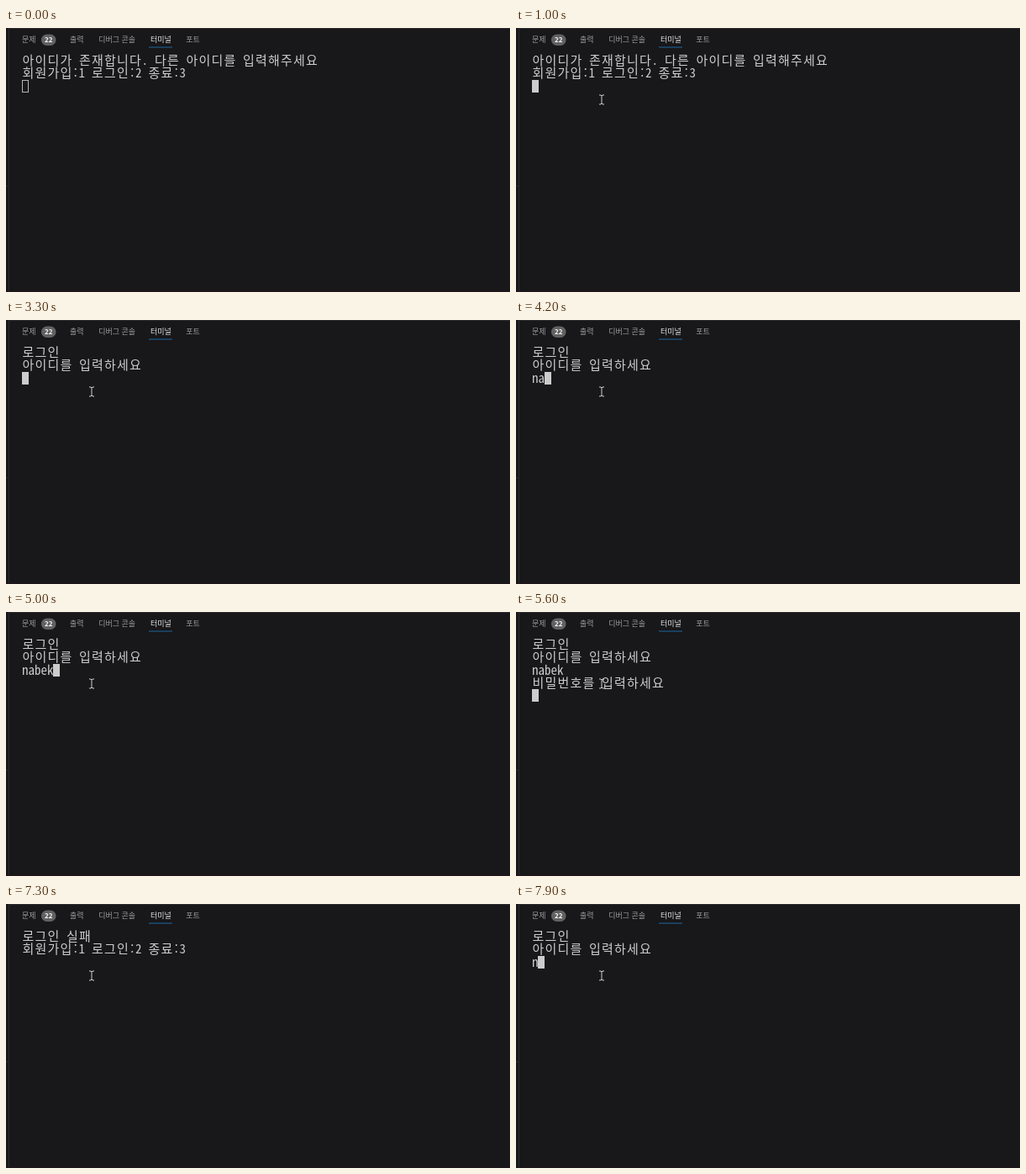
Animation of 600x315 px, one loop 8000 ms. Source, as an HTML page:

```html
<!DOCTYPE html>
<html lang="ko">
<head>
<meta charset="utf-8">
<style>
  html, body { margin: 0; width: 100%; height: 100%; overflow: hidden; background: #181719; }
  svg { display: block; }
  text { white-space: pre; }
  #tabs { font: 9px "Noto Sans CJK KR", "Noto Sans CJK", sans-serif; fill: #9d9d9d; }
  #rows { font: 15px "Noto Sans Mono CJK KR", "Noto Sans CJK KR", "Noto Sans Mono", monospace; fill: #ccc; text-anchor: middle; }
</style>
</head>
<body>
<svg width="600" height="315" viewBox="0 0 600 315">
  <path d="M3.5 0V314M0 188.5H3M3 .5H600" stroke="#2b2a2c" fill="none"/>
  <path d="M0 314.5H600" stroke="#211519"/>
  <g id="tabs">
    <text x="19" y="17">문제</text>
    <rect x="42" y="7.5" width="17.5" height="13.5" rx="6.7" fill="#616161"/>
    <text x="50.8" y="17.3" text-anchor="middle" fill="#f8f8f8" font-size="8" font-weight="700">22</text>
    <text x="76" y="17">출력</text>
    <text x="110.2" y="17">디버그 콘솔</text>
    <text x="172" y="17" fill="#e7e7e7">터미널</text>
    <text x="214.3" y="17">포트</text>
    <path d="M170 23H198" stroke="#1b6aa5"/>
  </g>
  <g id="rows"></g>
  <rect id="cursor"/>
  <path id="mouse" d="M-3 -5.5H-1L0 -4.5L1 -5.5H3M0 -4.5V4.5M-3 5.5H-1L0 4.5L1 5.5H3" fill="none" stroke="#d0d0d0"/>
</svg>
<script>
const LOOP = 8000, CELL = 7.5, LEFT = 19, PITCH = 15.2;
const $ = id => document.getElementById(id);
const menu = '회원가입:1 로그인:2 종료:3';
const taken = ['아이디가 존재합니다. 다른 아이디를 입력해주세요', menu];
const login = ['로그인', '아이디를 입력하세요'];
const user = 'nabek';
const secret = [...login, user, '비밀번호를 입력하세요'];
const failed = ['로그인 실패', menu];

// [start ms, finished lines, typed input]
const script = [
  [0, taken, ''], [1200, taken, '2'], [1500, login, ''],
  ...[4100, 4200, 4400, 4600, 4900].map((t, i) => [t, login, user.slice(0, i + 1)]),
  [5400, secret, ''],
  ...[5800, 5900, 6100, 6200].map((t, i) => [t, secret, '1234'.slice(0, i + 1)]),
  [6400, failed, ''], [7600, failed, '2'], [7700, login, ''], [7900, login, user[0]]
];
const blinkOff = [[2600, 3300], [4000, 4100], [7300, 7600]];

const cells = ch => ch >= '가' ? 2 : 1;
const width = s => [...s].reduce((w, ch) => w + cells(ch) * CELL, 0);

// Centre every character in its terminal cells.
function row(s, i) {
  let x = LEFT;
  const xs = [...s].map(ch => {
    const w = cells(ch) * CELL;
    x += w;
    return x - w / 2;
  });
  return `<text x="${xs.join(' ')}" y="${44.2 + i * PITCH}">${s}</text>`;
}

function set(id, attrs) {
  for (const name in attrs) $(id).setAttribute(name, attrs[name]);
}

let shown;
function draw(t) {
  const step = script.findLast(s => s[0] <= t);
  const [, lines, input] = step;
  if (step !== shown) {
    $('rows').innerHTML = [...lines, input].map(row).join('');
    shown = step;
  }

  const focused = t >= 800, inset = focused ? 0 : .5;
  set('cursor', {
    x: Math.floor(LEFT + width(input)) + inset,
    y: Math.round(31.5 + lines.length * PITCH) + inset,
    width: 8 - 2 * inset,
    height: 15 - 2 * inset,
    fill: focused ? '#ccc' : 'none',
    stroke: focused ? 'none' : '#b5b5b5',
    visibility: blinkOff.some(([a, b]) => t >= a && t < b) ? 'hidden' : 'visible'
  });

  const p = Math.min(1, Math.max(0, (t - 100) / 600)), left = (1 - p) ** 2;
  set('mouse', {
    transform: `translate(${102 + 261 * left} ${85.5 + 169 * left})`,
    visibility: t < 100 ? 'hidden' : 'visible'
  });
}

const start = performance.now();
function tick() {
  draw((performance.now() - start) % LOOP);
  requestAnimationFrame(tick);
}
tick();
</script>
</body>
</html>
```
